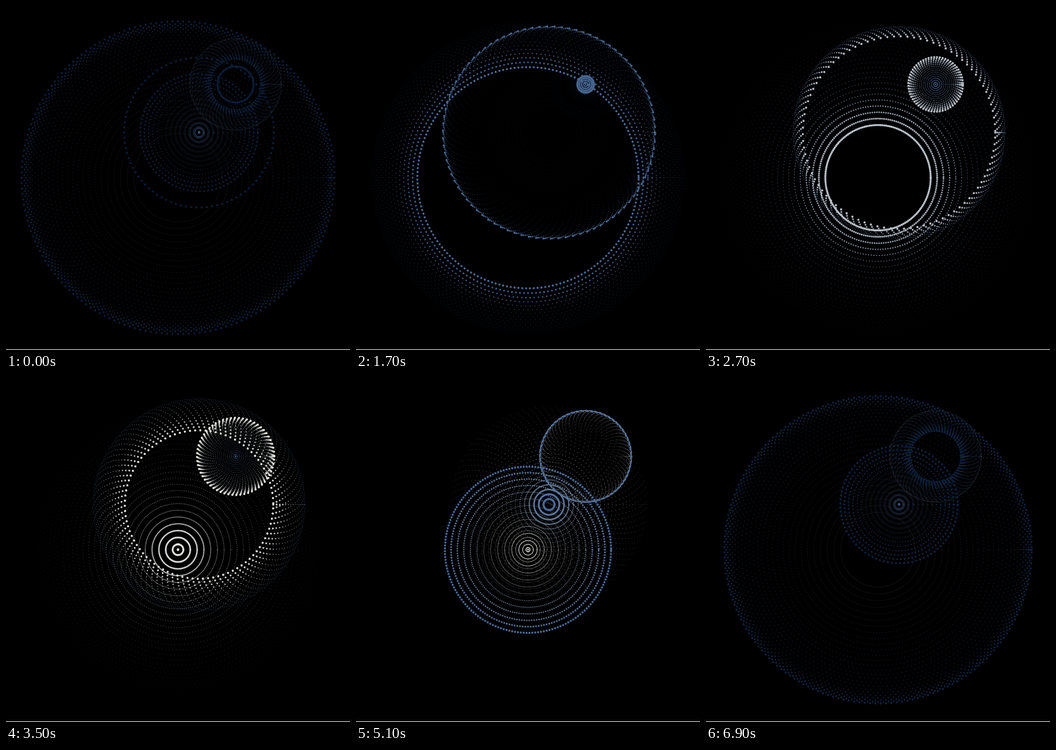
Write an HTML page without scripts that moves like this. It is 600x600 px and loops after 7000 ms.

```html
<!DOCTYPE html>
<html lang="en">
<head>
<meta charset="utf-8">
<title>Breathing rings</title>
<style>
  @property --f { syntax: "<number>"; inherits: true; initial-value: 0; }

  html, body { margin: 0; height: 100%; overflow: hidden; background: #000; }
  svg { display: block; width: 100%; height: 100%; }

  /* Each echo shows the rings as they were --k ticks ago, smaller and dimmer. */
  .echo {
    --w: max(1.6, 3.8 - .4 * var(--k));
    --alpha: pow(.92, var(--k));
    animation: tick 7s steps(70) infinite, tint 7s linear infinite;
    animation-delay: calc(var(--k) * 100ms - 7005ms);
  }
  @keyframes tick { from { --f: 0; } to { --f: 70; } }
  @keyframes tint {
    0%   { color: #0b1d39; }
    24%  { color: #466591; }
    38%  { color: #b7bec6; }
    50%  { color: #e4e4de; }
    58%  { color: #dcd9d0; }
    73%  { color: #476898; }
    84%  { color: #2e4a78; }
    100% { color: #0b1d39; }
  }

  /* --max: widest radius, --peak and --next: ticks of two peaks,
     --fall: degrees of the shrinking wave per tick, --n: number of dots */
  .a { --max: 273; --peak: -.8;   --next: 73.2; --fall: 2.53deg; --n: 180; }
  .b { --max: 185; --peak: 17.4;  --next: 90.6; --fall: 2.59deg; --n: 90; }
  .c { --max: 80;  --peak: -25.8; --next: 47.5; --fall: 2.59deg; --n: 60; }
  .ring {
    --r: max(.4, var(--max) * cos((var(--f) - var(--peak)) * var(--fall)),
                 var(--max) * cos((var(--f) - var(--next)) * 2.61deg));
    --overlap: max(1, var(--n) * var(--w) / (6.283 * var(--r)));
  }
  /* Dots turn by one degree per tick. */
  .ring circle {
    r: calc(var(--r) * 1px);
    fill: none;
    stroke: currentColor;
    stroke-width: calc(var(--w) * 1px);
    stroke-linecap: round;
    stroke-dasharray: 0 1;
    stroke-dashoffset: calc(var(--f) * var(--n) / -360 * 1px);
    stroke-opacity: calc(1 - pow(1 - var(--alpha), var(--overlap)));
  }
  .ring .seam { stroke-dasharray: 0 2; stroke-dashoffset: 0; }
</style>
</head>
<body>
<svg viewBox="0 0 600 600">
  <defs>
    <g id="rings">
      <g class="ring a" transform="translate(300 299.5)"><circle pathLength="180"/><circle class="seam" pathLength="1"/></g>
      <g class="ring b" transform="translate(336.7 220.7)"><circle pathLength="90"/><circle class="seam" pathLength="1"/></g>
      <g class="ring c" transform="translate(400.5 136.7)"><circle pathLength="60"/><circle class="seam" pathLength="1"/></g>
    </g>
  </defs>
  <use class="echo" href="#rings" style="--k:25"/>
  <use class="echo" href="#rings" style="--k:24"/>
  <use class="echo" href="#rings" style="--k:23"/>
  <use class="echo" href="#rings" style="--k:22"/>
  <use class="echo" href="#rings" style="--k:21"/>
  <use class="echo" href="#rings" style="--k:20"/>
  <use class="echo" href="#rings" style="--k:19"/>
  <use class="echo" href="#rings" style="--k:18"/>
  <use class="echo" href="#rings" style="--k:17"/>
  <use class="echo" href="#rings" style="--k:16"/>
  <use class="echo" href="#rings" style="--k:15"/>
  <use class="echo" href="#rings" style="--k:14"/>
  <use class="echo" href="#rings" style="--k:13"/>
  <use class="echo" href="#rings" style="--k:12"/>
  <use class="echo" href="#rings" style="--k:11"/>
  <use class="echo" href="#rings" style="--k:10"/>
  <use class="echo" href="#rings" style="--k:9"/>
  <use class="echo" href="#rings" style="--k:8"/>
  <use class="echo" href="#rings" style="--k:7"/>
  <use class="echo" href="#rings" style="--k:6"/>
  <use class="echo" href="#rings" style="--k:5"/>
  <use class="echo" href="#rings" style="--k:4"/>
  <use class="echo" href="#rings" style="--k:3"/>
  <use class="echo" href="#rings" style="--k:2"/>
  <use class="echo" href="#rings" style="--k:1"/>
  <use class="echo" href="#rings" style="--k:0"/>
  <rect y="599" width="600" height="1" fill="#fff"/>
</svg>
</body>
</html>
```
